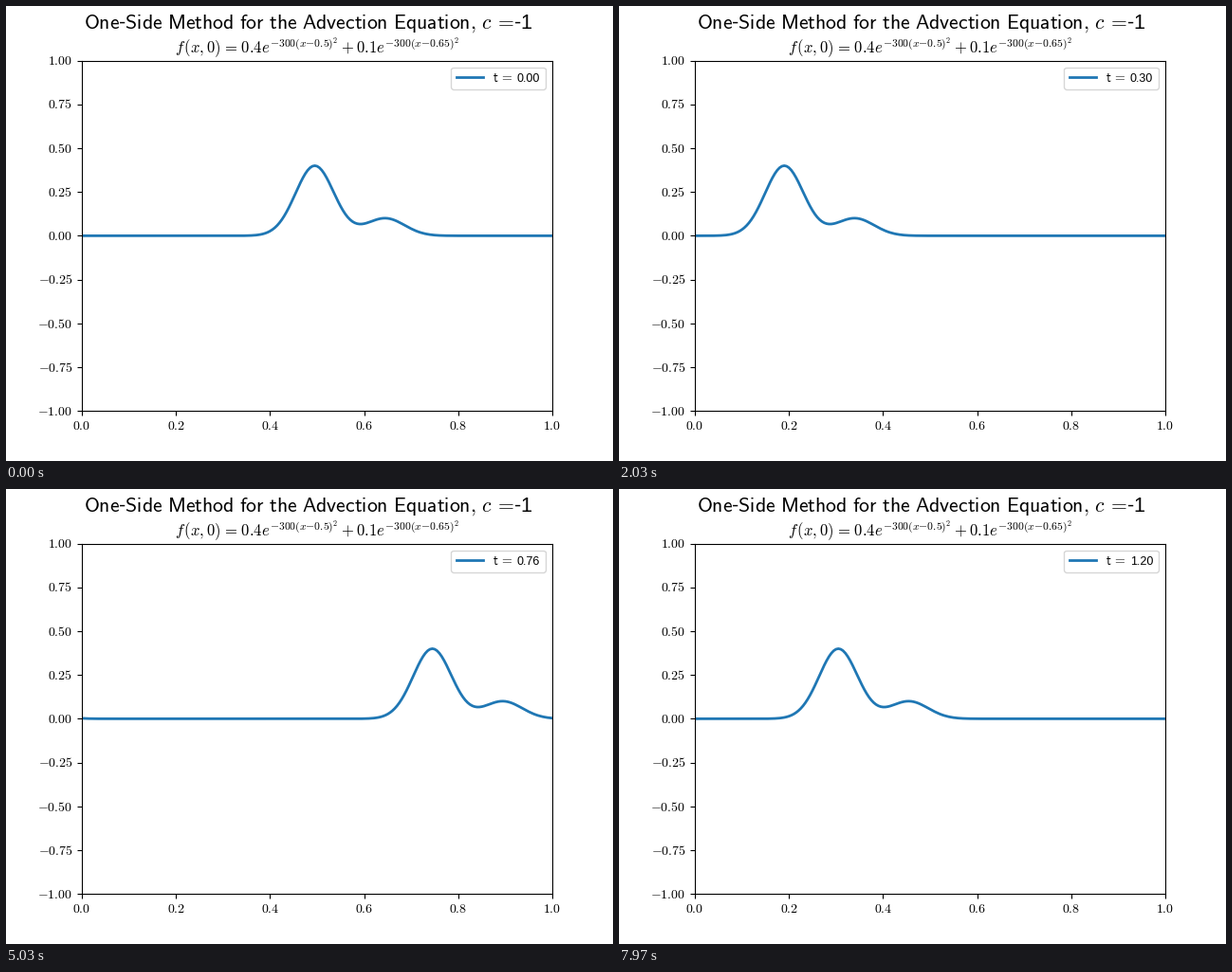
Animation of 640x480 px, one loop 8.01 s. Source, as a matplotlib script:

```python
import math

import numpy as np
import matplotlib.pyplot as plt
from matplotlib.animation import FuncAnimation
from matplotlib.lines import Line2D
from matplotlib.patches import FancyBboxPatch
from matplotlib.transforms import IdentityTransform, ScaledTranslation

W, H, DPI = 640, 480, 100
TICK_MS, LOOP_MS = 30, 8010
STEP_MS = 100 / 3
STEPS = 240
DT = 0.005
EM = 10 * DPI / 72

plt.rcParams.update({'font.family': 'Liberation Sans', 'mathtext.fontset': 'cm'})


def sans(text):
    return r'$\mathsf{%s}$' % text.replace(' ', r'\ ')


def pulse(x):
    return 0.4 * np.exp(-300 * (x - 0.5) ** 2) + 0.1 * np.exp(-300 * (x - 0.65) ** 2)


x = np.linspace(0, 1, 201)
u0 = pulse(x)

fig, ax = plt.subplots(figsize=(W / DPI, H / DPI), dpi=DPI)
pixels = IdentityTransform()


def label(px, py, text, size, **kw):
    """Text with its baseline at pixel (px, py), y measured from the top."""
    return fig.text(px, H - py, text, fontsize=size, va='baseline',
                    transform=pixels, **kw)


ax.set(xlim=(0, 1), ylim=(-1, 1))
ax.xaxis.set_major_formatter(lambda v, _: f'${v:.1f}$')
ax.yaxis.set_major_formatter(lambda v, _: f'${v:.2f}$')
ax.tick_params(axis='x', pad=2.6)
lift = ScaledTranslation(0, 0.8 / DPI, fig.dpi_scale_trans)
for tick_label in ax.get_yticklabels():
    tick_label.set_transform(tick_label.get_transform() + lift)

heading = (sans('One') + '-' + sans('Side Method for the Advection Equation,')
           + r'$\,c\,\mathsf{=}\hspace{-0.2}$-1')
label(318.5, 24, heading, 15.6, ha='center')
ax.set_title(r'$f\hspace{0.12}(x,0)\hspace{0.1}=\hspace{0.1}0.4e^{-300(x{-}0.5)^2}'
             r' + 0.1e^{-300(x{-}0.65)^2}$', fontsize=12, pad=5.2)

line, = ax.plot(x, u0, lw=2)

# Legend box with a sample line and a clock
box_x, box_y, box_w, box_h = 469.3, 88, 99.77, 23.45
fig.add_artist(FancyBboxPatch(
    (box_x, H - box_y), box_w, box_h, boxstyle='round,pad=0,rounding_size=0.2',
    mutation_scale=EM, fc='white', ec='0.8', alpha=0.8, snap=True, transform=pixels))
sample_x = box_x + 0.4 * EM
fig.add_artist(Line2D([sample_x, sample_x + 2 * EM], [H - 75.1] * 2, lw=2,
                      color='C0', solid_capstyle='projecting', transform=pixels))
label(512.8, 80.5, sans(r't\,='), 10, zorder=6)
clock = label(538.8, 80.5, '', 9, zorder=6)


def update(i):
    # Steps begin on whole 10 ms marks, so allow for their rounding.
    k = min(max(math.ceil((i * TICK_MS - 4) / STEP_MS), 0), STEPS - 1)
    # Upwind step at unit Courant number: a shift by one cell.
    line.set_ydata(np.roll(u0, -(k + 1)))
    clock.set_text(f't{k * DT:.2f}'[1:])
    return line, clock


anim = FuncAnimation(fig, update, frames=LOOP_MS // TICK_MS, interval=TICK_MS,
                     repeat=True, repeat_delay=0, cache_frame_data=False)
plt.show()
```
